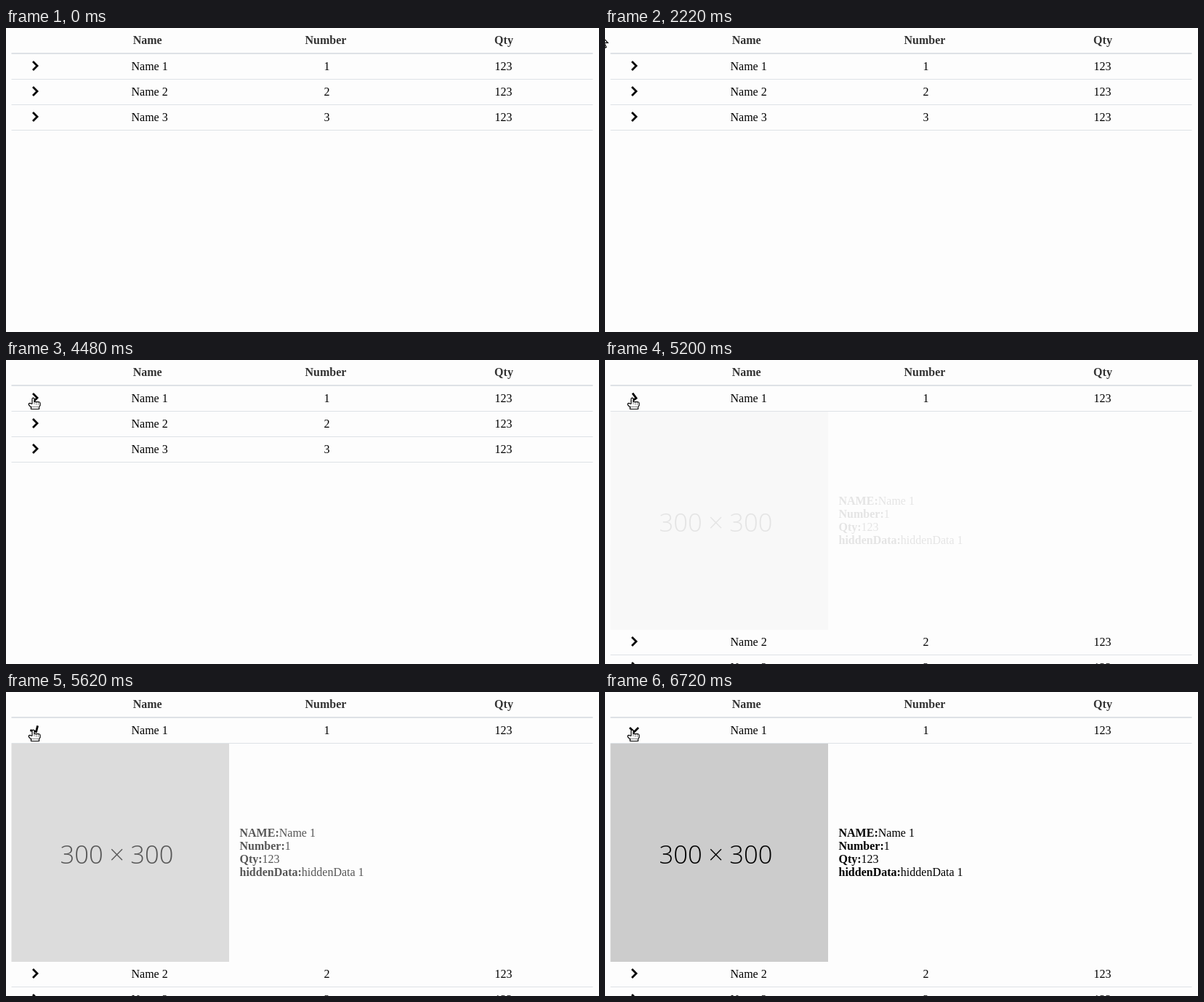
Animation, 816 px wide and 418 px high, one loop 8000 ms. Source, as an HTML page:

```html
<!DOCTYPE html>
<html lang="en">
<head>
<meta charset="utf-8">
<title>Expandable table rows</title>
<style>
  html, body { margin: 0; width: 100%; height: 100%; overflow: hidden; background: #fdfdfd; }
  svg { display: block; font: 16px "Liberation Serif", "Times New Roman", serif; fill: #000; }
  .head { font-weight: bold; fill: #333; }
  .mid { text-anchor: middle; }
  .line { fill: #dee2e6; }
  .chevron { fill: none; stroke: #000; stroke-width: 2.8; }
  .pointer { fill: #fff; stroke: #000; stroke-width: 1.2; }
  .size { font: 300 34.5px "Open Sans", sans-serif; }
  .b { font-weight: bold; }
</style>
</head>
<body>
<svg width="816" height="418" viewBox="0 0 816 418">
  <g class="head mid">
    <text x="194.7" y="22">Name</text>
    <text x="440" y="22">Number</text>
    <text x="685" y="22">Qty</text>
  </g>
  <rect class="line" x="7.5" y="34" width="800" height="2"/>
  <g id="detail">
    <rect x="7.5" y="71" width="299.5" height="300" fill="#ccc"/>
    <text class="size mid" x="152.5" y="235.5">300 × 300</text>
    <text x="321.5" y="199"><tspan class="b">NAME:</tspan>Name 1</text>
    <text x="321.5" y="217"><tspan class="b">Number:</tspan>1</text>
    <text x="321.5" y="235"><tspan class="b">Qty:</tspan>123</text>
    <text x="321.5" y="253"><tspan class="b">hiddenData:</tspan>hiddenData 1</text>
  </g>
  <g id="rows"></g>
  <path id="arrow" class="pointer" d="M.5 .5V17L4.4 13.4L7.2 19.6L9.8 18.4L7 12.3H12Z"/>
  <g id="hand">
    <path class="pointer" d="M-1 8.5V1.6Q-1 .2 .5 .2T2 1.6V5.5H7.5Q9.8 5.5 10 7.5V10.5L8.5 12.5V15.5H-2.5V13L-5.5 10Q-6.5 7.6 -4 7.4L-1 8.5"/>
    <path d="M2 5.5V9M4.7 6V9M7.3 6V9M-2 12.5H8" fill="none" stroke="#000" stroke-dasharray="1 1"/>
  </g>
</svg>
<script>
const LOOP = 8000, OPEN = 5050, FADE = 1500;
const $ = id => document.getElementById(id);

$('rows').innerHTML = [1, 2, 3].map(n => `<g>
  <path class="chevron" d="M-3 -6L3 0L-3 6"/>
  <text class="mid" x="197.6" y="58">Name ${n}</text>
  <text class="mid" x="441.5" y="58">${n}</text>
  <text class="mid" x="684.6" y="58">123</text>
  <rect class="line" x="7.5" y="70" width="800" height="1"/></g>`).join('');
const rows = [...$('rows').children];

// Pointer hotspot: time, x, y
const path = [
  [2220, -8, 8], [2360, 24, 12], [2660, 24, 12], [3060, 23, 14],
  [3380, 34, 42], [3480, 34, 42], [3760, 36, 56], [4060, 37, 52]
];

const clamp = v => Math.min(1, Math.max(0, v));

// CSS "ease" curve, solved by bisection
function ease(x) {
  const bez = (a, b, u) => 3 * a * u * (1 - u) ** 2 + 3 * b * u * u * (1 - u) + u ** 3;
  let lo = 0, hi = 1;
  for (let i = 0; i < 24; i++) {
    const u = (lo + hi) / 2;
    if (bez(.25, .25, u) < x) lo = u; else hi = u;
  }
  return bez(.1, 1, lo);
}

function pointerAt(t) {
  const i = path.findIndex(p => p[0] > t);
  if (i < 0) return path[path.length - 1].slice(1);
  if (i === 0) return [-40, 8];
  const [t0, x0, y0] = path[i - 1], [t1, x1, y1] = path[i];
  const k = (t - t0) / (t1 - t0);
  return [x0 + (x1 - x0) * k, y0 + (y1 - y0) * k];
}

function draw(t) {
  const open = t >= OPEN;
  const k = ease(clamp((t - OPEN) / FADE));

  rows.forEach((row, i) => {
    row.setAttribute('transform', `translate(0 ${35 * i + (open && i ? 300 : 0)})`);
    row.firstElementChild.setAttribute('transform', `translate(40 52) rotate(${i ? 0 : 90 * k})`);
  });
  $('detail').style.opacity = k;

  const [x, y] = pointerAt(t), over = y > 45;
  for (const [id, on] of [['arrow', !over], ['hand', over]]) {
    $(id).style.display = on ? '' : 'none';
    $(id).setAttribute('transform', `translate(${Math.round(x)} ${Math.round(y)})`);
  }
}

const start = performance.now();
(function tick() {
  draw((performance.now() - start) % LOOP);
  requestAnimationFrame(tick);
})();
</script>
</body>
</html>
```
